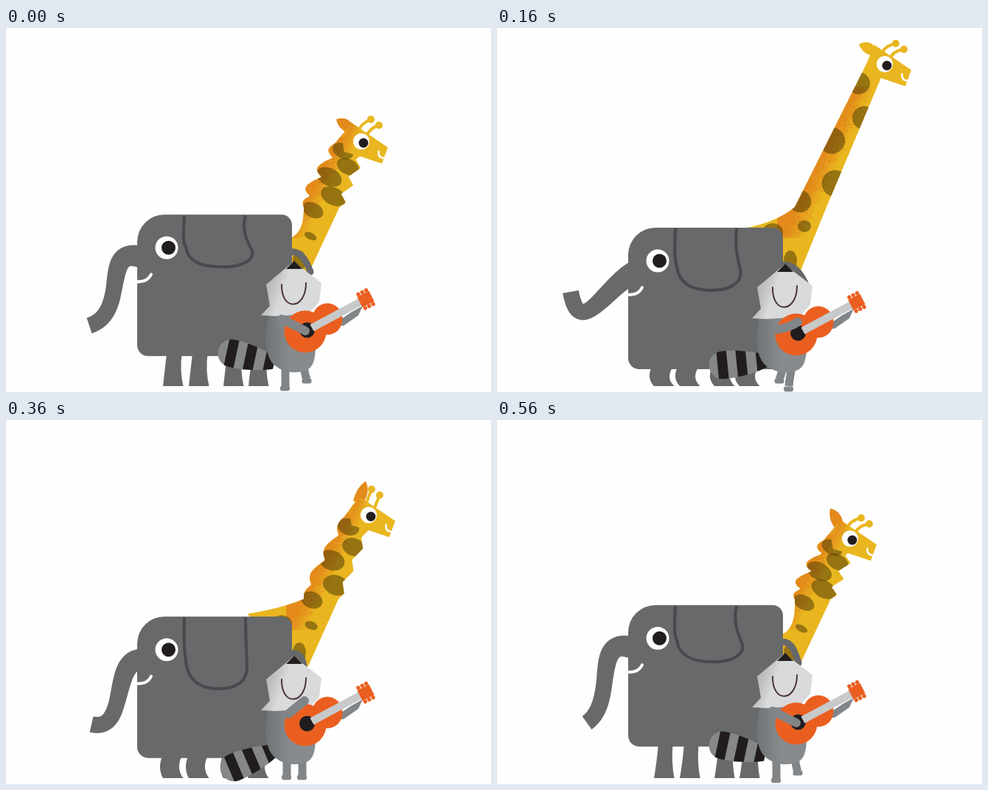
These frames come from a looping animation (658x494 px, 600 ms). An HTML page with a canvas:

```html
<!DOCTYPE html>
<html lang="en">
<head>
<meta charset="utf-8">
<title>Animal band</title>
<style>
html, body { margin: 0; width: 100%; height: 100%; overflow: hidden; background: #fefefe; }
canvas { display: block; }
</style>
</head>
<body>
<canvas id="stage" width="658" height="494"></canvas>
<script>
const ctx = document.getElementById('stage').getContext('2d');
const STEP = 40, COUNT = 15;
const GREY = '#67696b', INK = '#211d1f', WHITE = '#fefefe';
const YELLOW = '#e9b61f', AMBER = '#e38a1b', ORANGE = '#ea5f20', FUR = '#828587';
const clamp = (v, a = 0, b = 1) => Math.min(b, Math.max(a, v));
const mix = (a, b, t) => a + (b - a) * t;

// Smooth periodic curve through values at uneven key times.
const KEYS = [0, 2, 4, 7, 9, 11, 14];
function curve(values, n) {
  const m = KEYS.length;
  const time = i => KEYS[(i + m) % m] + Math.floor(i / m) * COUNT;
  const value = i => values[(i + m) % m];
  const slope = i => (value(i + 1) - value(i - 1)) / (time(i + 1) - time(i - 1));
  let i = 0;
  while (i < m - 1 && KEYS[i + 1] <= n) i++;
  const d = time(i + 1) - time(i), t = (n - time(i)) / d, t2 = t * t, t3 = t2 * t;
  return (2 * t3 - 3 * t2 + 1) * value(i) + (3 * t2 - 2 * t3) * value(i + 1)
    + d * ((t3 - 2 * t2 + t) * slope(i) + (t3 - t2) * slope(i + 1));
}

const motion = {
  eyeX: [485, 523, 529, 526, 495, 483, 482],
  eyeY: [156, 65, 51, 59, 131, 161, 163],
  earX: [-37, -39, -38, -21, -7, -13, -30],
  earY: [-32, -24, -29, -47, -48, -48, -43],
  hornX: [10, 17, 12, -1, 1, 7, 12],
  hornY: [-32, -21, -30, -40, -37, -34, -30],
  backX: [386, 362, 334, 326, 328, 386, 388],
  backY: [285, 264, 272, 275, 263, 288, 290],
  trunkX1: [125, 135, 147, 140, 140, 130, 125],
  trunkY1: [290, 310, 351, 330, 318, 300, 288],
  trunkX2: [170, 155, 112, 172, 168, 172, 165],
  trunkY2: [385, 395, 425, 450, 425, 390, 380],
  trunkX3: [113, 95, 100, 112, 116, 124, 122],
  trunkY3: [404, 387, 358, 401, 413, 415, 411],
  flap: [1, 1, .5, 0, 0, .1, .85],
  flapH: [71, 72, 85, 96, 98, 91, 77],
  tailCX: [402, 400, 405, 395, 404, 398, 400],
  tailCY: [300, 332, 318, 330, 312, 302, 296],
  tailX: [413, 424, 418, 396, 404, 398, 409],
  tailY: [331, 328, 346, 345, 340, 330, 330]
};

function poly(points, color) {
  ctx.beginPath();
  points.forEach(p => ctx.lineTo(...p));
  ctx.closePath();
  ctx.fillStyle = color;
  ctx.fill();
}
function oval(x, y, rx, ry, color, turn = 0) {
  ctx.beginPath();
  ctx.ellipse(x, y, rx, ry, turn, 0, 7);
  ctx.fillStyle = color;
  ctx.fill();
}
const dot = (x, y, r, color) => oval(x, y, r, r, color);
function line(d, color, width, cap = 'round') {
  ctx.lineWidth = width;
  ctx.lineCap = cap;
  ctx.lineJoin = 'round';
  ctx.strokeStyle = color;
  ctx.stroke(new Path2D(d));
}
function shape(d, color) {
  ctx.fillStyle = color;
  ctx.fill(new Path2D(d));
}
function randomizer(seed) {
  return () => (seed = seed * 16807 % 2147483647) / 2147483647;
}

function drawGiraffe(p) {
  const { eyeX: ex, eyeY: ey } = p;
  const fold = clamp((ey - 60) / 100);
  const y = u => mix(243, ey, u);
  const left = u => mix(404, ex - 29, u);
  const right = u => mix(447, ex - 1, u);
  const bulge = u => 14 * fold * Math.abs(Math.sin(Math.PI * (u - .17) / .3)) * clamp(u * 6);
  const pleat = u => {
    const k = ((u - .07) / .27 % 1 + 1) % 1;
    return 12 * fold * Math.abs(1 - 2 * k);
  };

  const neck = new Path2D();
  neck.moveTo(380, 345);
  neck.lineTo(p.backX, p.backY);
  neck.quadraticCurveTo((p.backX + 404) / 2 + 10, p.backY - 8, 404, 243);
  for (let u = 0; u <= 1.001; u += .02) neck.lineTo(left(u) - bulge(u), y(u));
  neck.lineTo(ex - 17, ey - 26);
  for (let u = 1; u >= -.001; u -= .01) neck.lineTo(right(u) + pleat(u), y(u));
  neck.lineTo(410, 334);
  neck.closePath();

  // Ear
  const tx = ex + p.earX, ty = ey + p.earY;
  const bx = ex - 18, by = ey - 19;
  const len = Math.hypot(tx - bx, ty - by);
  const nx = (ty - by) / len * 9, ny = (bx - tx) / len * 9;
  const mx = mix(bx, tx, .6), my = mix(by, ty, .6);
  shape(`M${bx + nx * .7} ${by + ny * .7}Q${mx + nx} ${my + ny} ${tx} ${ty}
    Q${mx - nx * 1.4} ${my - ny * 1.4} ${bx - nx * .7} ${by - ny * .7}Z`, fold > .4 ? AMBER : YELLOW);

  ctx.save();
  ctx.fillStyle = YELLOW;
  ctx.fill(neck);
  ctx.clip(neck);

  // Grainy shade along the back of the neck
  const my2 = y(.45), ml = left(.45) - 10 * fold;
  const shade = ctx.createLinearGradient(ml, my2, ml + 23, my2 + 11);
  shade.addColorStop(0, 'rgba(226,130,27,.85)');
  shade.addColorStop(.4, 'rgba(226,130,27,.55)');
  shade.addColorStop(1, 'rgba(226,130,27,0)');
  ctx.fillStyle = shade;
  const top = mix(y(.85), ey - 30, fold);
  ctx.fillRect(380, top, 200, 285 - top);
  const rnd = randomizer(41);
  ctx.fillStyle = AMBER;
  for (let i = 0; i < 900; i++) {
    const u = mix(-.2, mix(.85, 1.1, fold), rnd());
    const reach = mix(20, 30, clamp(1 - u));
    ctx.fillRect(left(u) - 12 * fold + rnd() * rnd() * reach + 2, y(u), 1.5, 1.5);
  }
  const SPOT = 'rgba(82,62,8,.55)';
  const spots = [[.875, .1, 15], [.63, 1, 16], [.47, .14, 18], [.167, .95, 18], [.04, .08, 15]];
  for (const [u, v, r] of spots) {
    const side = v + fold * (.5 - v) * .4;
    oval(mix(left(u), right(u), side), y(u) + fold * (u < .1 ? 8 : 0),
      r, r * mix(1, .65, fold), SPOT, .5 * fold);
  }
  oval(mix(417, 413, fold), mix(269, 283, fold), 9, mix(8, 4.5, fold), SPOT, .5 * fold);
  oval(374, 277, 14, 12, SPOT);
  oval(398, 316, 9, 14, SPOT);
  ctx.restore();

  ctx.save();
  ctx.translate(ex, ey);
  for (const i of [0, 1]) {
    const x = -7 + 11 * i, yy = -16 + 7 * i;
    const hx = p.hornX + 11 * i, hy = p.hornY + 8 * i;
    line(`M${x} ${yy}Q${x + 4} ${yy - 11} ${hx} ${hy}`, YELLOW, 4);
    dot(hx, hy, 5, YELLOW);
  }
  poly([[-17, -28], [33, 6], [25, 28], [-8, 17], [-26, 12], [-28, 0]], YELLOW);
  if (fold > .4) {
    const g = ctx.createLinearGradient(-28, -6, -10, 3);
    g.addColorStop(0, 'rgba(226,130,27,.85)');
    g.addColorStop(1, 'rgba(226,130,27,0)');
    poly([[-17, -28], [-6, -20], [-12, 16], [-26, 12], [-28, 0]], g);
  }
  dot(-3, -2, 11, WHITE);
  dot(0, 0, 6.5, INK);
  line('M20.500 11.500Q20 20 27 20.500', WHITE, 2.6);
  ctx.restore();
}

function drawTrunk(p, top) {
  const pts = [[188, top + 59], [p.trunkX1, p.trunkY1], [p.trunkX2, p.trunkY2], [p.trunkX3, p.trunkY3]];
  const a = [], b = [];
  for (let i = 0; i <= 32; i++) {
    const t = i / 32, s = 1 - t;
    const at = k => s * s * s * pts[0][k] + 3 * s * s * t * pts[1][k] + 3 * s * t * t * pts[2][k] + t * t * t * pts[3][k];
    const dir = k => s * s * (pts[1][k] - pts[0][k]) + 2 * s * t * (pts[2][k] - pts[1][k]) + t * t * (pts[3][k] - pts[2][k]);
    const dx = dir(0), dy = dir(1), w = mix(15, 11, clamp(t * 1.7)) / Math.hypot(dx, dy);
    a.push([at(0) - dy * w, at(1) + dx * w]);
    b.unshift([at(0) + dy * w, at(1) - dx * w]);
  }
  poly([...a, ...b], GREY);
}

function drawElephant(p, top) {
  const base = top + 192, squash = (top - 251) / 24;
  line(`M384 ${top + 51}Q${p.tailCX} ${p.tailCY} ${p.tailX} ${p.tailY}`, GREY, 9);

  for (const x of [213, 248, 295, 329]) {
    const r = x + 27.5, mid = (base + 486) / 2;
    shape(`M${x + 6 - 10 * squash} ${base - 4}Q${x + 4 - 18 * squash} ${mid} ${x} 486
      H${r}Q${r - 4 - 10 * squash} ${mid} ${r - 2 + squash} ${base - 4}Z`, GREY);
  }
  ctx.beginPath();
  ctx.roundRect(178, top, 210, 192, [37, 14, 14, 15]);
  ctx.fillStyle = GREY;
  ctx.fill();
  drawTrunk(p, top);

  const e = p.flap, h = p.flapH;
  ctx.save();
  ctx.translate(0, top);
  line(`M242 1C241 ${h * .35} ${242 - 3 * e} ${h * .5} 244 ${h * .62}
    C247 ${h * .9} 265 ${h} ${288 + 6 * e} ${h}
    C${315 + 3 * e} ${h} ${327 + 10 * e} ${h * .88} ${327 + 7 * e} ${h * .7}
    C${327 + 4 * e} ${h * .58} ${325 - 7 * e} ${h * .35} 325 1`, '#4a484c', 4, 'butt');
  dot(218, 45, 15.5, WHITE);
  dot(220.5, 45, 9.5, INK);
  line('M177 91Q192 92 197 81', WHITE, 4);
  ctx.restore();
}

// Strumming poses: low, high, middle
const POSES = [
  { head: 0, guitar: 0, tail: [360, 453, .21], arm: 'M374 395L406 411',
    legs: 'M379 455V487M404 452Q404 466 408 477', feet: [[378.5, 489], [408, 479]] },
  { head: 4, guitar: 2, tail: [360, 450, -.4], arm: 'M383 399L405 381',
    legs: 'M381 457V483M402 455V483', feet: [[380.5, 485], [401.5, 485]] },
  { head: 4, guitar: 4, tail: [361, 452, -.1], arm: 'M380 409Q396 407 408 399',
    legs: 'M388 455Q387 468 383 477M401 455Q397 474 396 486', feet: [[383, 479], [395.5, 490]] }
];

function drawRaccoon(pose) {
  const [rx, ry, turn] = pose.tail;
  ctx.save();
  ctx.translate(rx, ry);
  ctx.rotate(turn);
  const tail = new Path2D('M4 -9C-20 -16 -38 -19 -54 -19C-80 -19 -80 19 -54 19C-34 19 -16 16 4 9Z');
  ctx.fillStyle = '#858789';
  ctx.fill(tail);
  ctx.clip(tail);
  ctx.fillStyle = INK;
  for (const x of [-62, -36, -9]) ctx.fillRect(x, -24, 13.5, 48);
  ctx.restore();

  line(pose.legs, FUR, 11, 'butt');
  for (const [x, y] of pose.feet) {
    ctx.beginPath();
    ctx.roundRect(x - 6.5, y - 3.5, 13, 7, 3);
    ctx.fillStyle = FUR;
    ctx.fill();
  }

  const fur = ctx.createLinearGradient(353, 0, 385, 0);
  fur.addColorStop(0, '#717476');
  fur.addColorStop(1, '#888b8d');
  shape('M358 388C350 410 350 440 361 454C372 468 397 471 410 463C422 455 421 432 418 400L405 385Z', fur);

  ctx.save();
  ctx.translate(0, pose.head);
  const face = ctx.createLinearGradient(354, 355, 374, 362);
  face.addColorStop(0, '#b8babb');
  face.addColorStop(.5, '#c5c7c8');
  face.addColorStop(1, '#d9dadb');
  poly([[390, 317], [353, 348], [358, 377], [346, 390], [366, 391], [410, 388], [425, 372], [428, 346]], face);
  poly([[391, 316], [380, 327], [402, 327]], INK);
  line('M374 348C373 385 407 383 407 346', '#4b343d', 2);
  ctx.restore();

  ctx.save();
  ctx.translate(0, pose.guitar);
  poly([[440, 405], [468, 386], [484, 377], [478, 390], [458, 404]], FUR);
  dot(406, 412, 28.5, ORANGE);
  oval(436, 395, 20.5, 21.5, ORANGE);
  dot(408.5, 410, 10.5, INK);
  line('M415 407L482 371', '#c7c9ca', 10.5, 'butt');
  ctx.save();
  ctx.translate(488, 368);
  ctx.rotate(-.47);
  ctx.fillStyle = ORANGE;
  ctx.fillRect(-9, -8, 18, 16);
  for (const x of [-6, 0, 6]) {
    dot(x, -10.5, 2.7, ORANGE);
    dot(x, 10.5, 2.7, ORANGE);
  }
  ctx.restore();
  ctx.restore();
  line(pose.arm, FUR, 12);
}

function draw(n) {
  const p = {};
  for (const key in motion) p[key] = curve(motion[key], n);
  const top = 263 - 12 * Math.cos((n - 13.5) / COUNT * 2 * Math.PI);
  ctx.fillStyle = WHITE;
  ctx.fillRect(0, 0, 658, 494);
  drawGiraffe(p);
  drawElephant(p, top);
  drawRaccoon(POSES[Math.min(2, Math.floor(n % 7 / 2))]);
}

function tick() {
  draw(Math.floor(performance.now() / STEP) % COUNT);
  requestAnimationFrame(tick);
}
tick();
</script>
</body>
</html>
```
